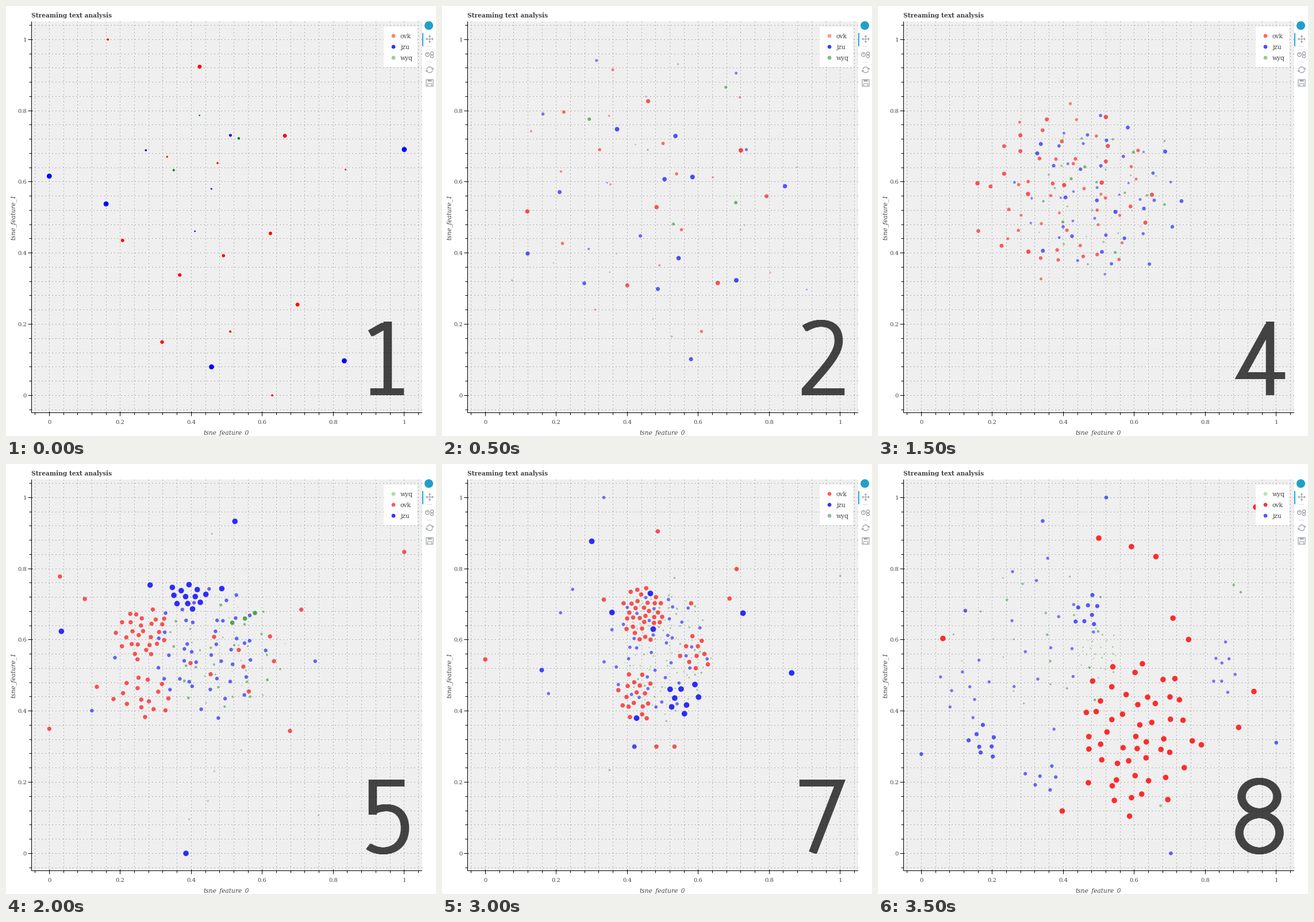
A matplotlib script that plays this animation: 748x748 px, repeating every 4000 ms.

```python
import math

import numpy as np
import matplotlib.pyplot as plt
from matplotlib.animation import FuncAnimation
from matplotlib.patches import Circle, PathPatch, Polygon, Rectangle
from matplotlib.path import Path
from matplotlib.transforms import Affine2D

DPI = 68
PX = 72 / DPI  # points per pixel
RED, BLUE, GREEN = (1, 0, 0), (0, 0, 1), (0, 0.5, 0)
INK, ICON = "#444444", "#a1a6a9"
TEAMS = {"ovk": RED, "jzu": BLUE, "wyq": GREEN}

fig = plt.figure(figsize=(11, 11), dpi=DPI, facecolor="white")
ax = fig.add_axes([0, 0, 1, 1])
ax.set_xlim(0, 748)
ax.set_ylim(748, 0)
ax.axis("off")


def px(u):
    return 75.3 + 617.5 * u


def py(v):
    return 677.3 - 619 * v


def line(xs, ys, color="black", width=1, z=3, **kw):
    ax.plot(xs, ys, color=color, lw=width * PX, zorder=z, snap=False,
            solid_capstyle="butt", dash_capstyle="butt", **kw)


def label(x, y, s, size=10.67, **kw):
    return ax.text(x, y, s, fontsize=size * PX, family="DejaVu Serif",
                   color=INK, va="baseline", zorder=8, **kw)


# Plot area, grid and axes
ax.add_patch(Rectangle((44, 27), 680, 681, fc="#efefef", ec="none", zorder=0))
for i in range(-1, 27):
    x, y = (math.floor(p(i * 0.04)) + 0.5 for p in (px, py))
    line([x, x], [707, 27], "#adadad", z=1, ls=(0, (2, 4)))
    line([44, 724], [y, y], "#adadad", z=1, ls=(0, (2, 4)))
    major = i % 5 == 0
    inner, outer = (2, 6) if major else (0, 4)
    line([x, x], [707.5 - inner, 707.5 + outer])
    line([44.5 - outer, 44.5 + inner], [y, y])
    if major:
        text = f"{i * 0.04:.1f}".replace(".0", "")
        label(x, 727, text, 10, ha="center")
        label(36, y + 3.5, text, 10, ha="right")
line([44.5, 44.5], [27, 708])
line([44, 724], [707.5, 707.5])
label(44, 20, "Streaming text analysis", weight="bold")
label(383.5, 745, "tsne_feature_0", style="italic", ha="center")
label(16, 367, "tsne_feature_1", style="italic", ha="center",
      rotation=90, rotation_mode="anchor")


# Toolbar
def ring(x, y, r, a=0, b=360):
    t = np.radians(np.linspace(a, b, 30))
    line(x + r * np.cos(t), y + r * np.sin(t), ICON, 1.4)


def arrow(*corners):
    ax.add_patch(Polygon(corners, fc=ICON, ec="none", zorder=3))


ax.add_patch(Circle((735.5, 34), 7.5, fc="#20a0c8", ec="none"))
line([725, 725], [47, 70], "#26aae1", 2)
for y in (70.5, 97.5):
    line([732, 741], [y, y], "#dddddd")
line([732, 742], [57.5, 57.5], ICON, 1.2)
line([737, 737], [52, 63], ICON, 1.2)
for d in ((1, 0), (-1, 0), (0, 1), (0, -1)):
    d = np.array(d)
    tip = d * 7 + (737, 57.5)
    arrow(tip, tip - 3 * d + 2.6 * d[::-1], tip - 3 * d - 2.6 * d[::-1])
ring(733, 84.5, 3.4)
line([733, 733], [81, 85], ICON, 1.2)
ring(741, 82.5, 2.6)
ring(741, 87.5, 2.4)
for s, start in ((1, 190), (-1, 10)):
    ring(737, 111, 5, start, start + 150)
    arrow((737 + s * 7, 111 - s * 4), (737 + s * 6.5, 111),
          (737 + s * 2.5, 111 - s))
line([731, 743, 743, 731, 731], [128, 128, 139.5, 139.5, 128], ICON, 1.3)
line([733.5, 740.5], [130, 130], ICON, 3)
line([733.5, 733.5, 740.5, 740.5], [139, 135, 135, 139], ICON, 1.2)

# Legend
ax.add_patch(Rectangle((657, 36), 58, 70, fc="white", ec="none",
                       alpha=0.95, zorder=6))
rows = [52, 71, 90]
keys = ax.scatter([674] * 3, rows, s=(6.8 * PX) ** 2, lw=0, zorder=8)
names = [label(686, y + 4, "") for y in rows]
LEGEND = [
    (("ovk", 0.5), ("jzu", 0.8), ("wyq", 0.38)),
    (("ovk", 0.4), ("jzu", 0.75), ("wyq", 0.5)),
    (("ovk", 0.3), ("jzu", 0.75), ("wyq", 0.65)),
    (("ovk", 0.6), ("jzu", 0.7), ("wyq", 0.4)),
    (("wyq", 0.3), ("ovk", 0.65), ("jzu", 0.8)),
    (("ovk", 0.8), ("jzu", 0.75), ("wyq", 0.35)),
    (("ovk", 0.65), ("jzu", 0.8), ("wyq", 0.45)),
    (("wyq", 0.25), ("ovk", 0.8), ("jzu", 0.65)),
]

# Step numerals: centre lines drawn with a pen wider than it is tall
numerals = []


def bar(*xy):
    return Path(np.reshape(xy, (-1, 2)))


def curve(*xy):
    pts = np.reshape(xy, (-1, 2))
    return Path(pts, [Path.MOVETO] + [Path.CURVE4] * (len(pts) - 1))


def oval(x, y, rx, ry):
    return Affine2D().scale(rx, ry).translate(x, y).transform_path(
        Path.unit_circle())


def numeral(*parts):
    shape = Path.make_compound_path(*parts)
    numerals.append(Path.make_compound_path(
        *(Affine2D().translate(dx, 0).transform_path(shape)
          for dx in (-1.25, 1.25))))


numeral(bar(634, 569.5, 658, 556), bar(664, 549, 664, 671),
        bar(635, 671, 691, 671))
numeral(curve(631, 561, 640, 555, 650, 552, 659, 552, 680, 552, 690, 564,
              690, 582, 690, 604, 672, 624, 632, 669),
        bar(627, 671, 699, 671))
numeral(curve(629, 560, 638, 555, 648, 552, 658, 552, 677, 552, 688, 562,
              688, 577, 688, 595, 674, 606, 654, 606),
        bar(648, 606, 656, 606),
        curve(654, 606, 680, 606, 694, 618, 694, 638, 694, 660, 678, 673,
              655, 673, 645, 673, 634, 670, 627, 665))
numeral(bar(707, 643, 632, 643, 680, 556), bar(682, 549, 682, 677))
numeral(bar(692, 555, 638, 555, 638, 610),
        curve(637, 604, 645, 600, 653, 598, 662, 598, 682, 598, 694, 612,
              694, 633, 694, 658, 678, 673, 656, 673, 647, 673, 637, 670,
              631, 665))
numeral(curve(696, 556, 689, 553, 683, 552, 677, 552, 645, 552, 628, 576,
              628, 619, 628, 655, 641, 673, 663, 673, 683, 673, 697, 658,
              697, 636, 697, 614, 683, 600, 664, 600, 646, 600, 628, 610,
              628, 634))
numeral(bar(623, 555, 692, 555, 645, 676))
numeral(oval(663.5, 578.5, 31, 26.5), oval(663.5, 641.5, 35, 31.5))
big = ax.add_patch(PathPatch(numerals[0], fill=False, ec=(0, 0, 0, 0.72),
                             lw=12 * PX, capstyle="butt", joinstyle="miter",
                             zorder=4))

# Dots per step: rows of u, v, radius, r, g, b
steps = [[] for _ in range(8)]
rng = np.random.default_rng(12)


def dots(k, colour, r, *points):
    steps[k] += [(u, v, r, *colour) for u, v in points]


def cloud(k, colour, n, centre, spread, small, large=None):
    """Jittered sunflower pattern: even spacing inside an ellipse."""
    turn = rng.uniform(0, 6)
    for i in range(n):
        a = turn + i * math.pi * (3 - math.sqrt(5))
        rho = ((i + 0.5) / n) ** 0.55
        u, v = centre + spread * (rho * np.array([math.cos(a), math.sin(a)])
                                  + rng.normal(0, 0.06, 2))
        dots(k, colour, rng.uniform(small, large or small), (u, v))


def settle(rows):
    """Push dots apart until they stop touching."""
    rows = np.array(rows)
    p, r = rows[:, :2], rows[:, 2]
    gap = (r[:, None] + r + 3) / 618
    for _ in range(15):
        d = p[:, None] - p
        dist = np.hypot(d[..., 0], d[..., 1]) + np.eye(len(p))
        push = np.clip(gap - dist, 0, None) / dist
        p += 0.3 * (d * push[..., None]).sum(axis=1)
        np.clip(p, 0, 1, out=p)
    return rows


cloud(0, GREEN, 3, (0.41, 0.72), (0.15, 0.16), 1.1, 2.4)
cloud(0, BLUE, 4, (0.38, 0.6), (0.22, 0.18), 1.1, 2.6)
cloud(0, RED, 12, (0.47, 0.48), (0.36, 0.48), 1.3, 3.6)
dots(0, RED, 1.9, (0.165, 1), (0.628, 0))
dots(0, BLUE, 4.4, (0, 0.616), (1, 0.691), (0.16, 0.538), (0.457, 0.08),
     (0.831, 0.097))

cloud(1, GREEN, 7, (0.48, 0.54), (0.34, 0.4), 1.2, 3.2)
cloud(1, BLUE, 22, (0.5, 0.53), (0.44, 0.46), 1.2, 4.2)
cloud(1, RED, 32, (0.46, 0.56), (0.42, 0.42), 1.2, 4)

cloud(2, GREEN, 7, (0.48, 0.5), (0.15, 0.14), 1.5, 3.6)
cloud(2, BLUE, 38, (0.43, 0.58), (0.33, 0.3), 1, 3.2)
cloud(2, RED, 56, (0.44, 0.6), (0.33, 0.31), 1.3, 3.7)
dots(2, GREEN, 2.3, (0, 0.755), (0.623, 0.973))
dots(2, BLUE, 2.7, (0.043, 0), (0.106, 0.502), (0.687, 0.315))
dots(2, BLUE, 4, (0.606, 0.779), (0.406, 0.56), (0.244, 0.472),
     (0.401, 0.371))
dots(2, RED, 2, (1, 0.387))
dots(2, RED, 4.8, (0.21, 0.83))

cloud(3, GREEN, 32, (0.5, 0.56), (0.2, 0.2), 1.1, 2.6)
cloud(3, BLUE, 48, (0.5, 0.57), (0.24, 0.24), 2, 3.6)
cloud(3, RED, 58, (0.4, 0.57), (0.25, 0.25), 2.5, 3.8)

cloud(4, GREEN, 46, (0.5, 0.56), (0.17, 0.17), 0.9, 2.6)
dots(4, GREEN, 1.5, (0.458, 0.898), (0.541, 0.29), (0.465, 0.231),
     (0.447, 0.147), (0.394, 0.096), (0.758, 0.107))
dots(4, GREEN, 3.8, (0.519, 0.653), (0.557, 0.665), (0.569, 0.672))
cloud(4, BLUE, 45, (0.45, 0.57), (0.17, 0.18), 3.2)
dots(4, BLUE, 3.2, (0.749, 0.54), (0.185, 0.55), (0.12, 0.401))
cloud(4, RED, 28, (0.262, 0.617), (0.075, 0.08), 3.7)
cloud(4, RED, 16, (0.265, 0.44), (0.09, 0.065), 3.7)
cloud(4, RED, 8, (0.54, 0.54), (0.14, 0.1), 3.7)
dots(4, RED, 3.7, (0.03, 0.778), (0.1, 0.715), (1, 0.847), (0.71, 0.685),
     (0, 0.35), (0.678, 0.344), (0.134, 0.468))
cloud(4, BLUE, 12, (0.392, 0.725), (0.06, 0.04), 4.8)
dots(4, BLUE, 4.8, (0.523, 0.933), (0.284, 0.754), (0.486, 0.744),
     (0.034, 0.624), (0.385, 0))

cloud(5, GREEN, 76, (0.32, 0.52), (0.18, 0.17), 0.9, 1.8)
dots(5, GREEN, 1.8, (0.034, 0.466), (0.114, 0.607), (0.5, 0.278),
     (0.433, 0.356), (0.647, 0.478), (0.462, 0.77))
cloud(5, BLUE, 33, (0.33, 0.52), (0.19, 0.15), 2.5, 3.2)
dots(5, BLUE, 2.5, (0.249, 0.847), (0.168, 0.779), (0.352, 0.223))
cloud(5, BLUE, 16, (0.485, 0.495), (0.06, 0.075), 4.2)
dots(5, BLUE, 4.2, (0.582, 0.713), (0.635, 0.677), (0.798, 0.674),
     (0.855, 0.558), (0.614, 0.593), (0.614, 0.224), (0.473, 0.171))
cloud(5, RED, 36, (0.45, 0.61), (0.15, 0.08), 4.8)
cloud(5, RED, 15, (0.36, 0.48), (0.22, 0.09), 4.8)
dots(5, RED, 4.8, (0.111, 1), (0.713, 0.874), (0.399, 0.864), (0.528, 0.746),
     (0, 0.54), (0.142, 0.334), (0.387, 0.191), (0.86, 0), (0.128, 0.445))

cloud(6, GREEN, 84, (0.51, 0.565), (0.12, 0.18), 0.9, 1.8)
dots(6, GREEN, 1.8, (1, 0.78), (0.35, 0.234), (0.533, 0.774))
cloud(6, BLUE, 40, (0.48, 0.57), (0.14, 0.18), 2.9)
dots(6, BLUE, 2.8, (0.334, 1), (0.246, 0.742), (0.212, 0.676), (0.178, 0.449))
dots(6, BLUE, 4, (0.159, 0.515), (0.42, 0.3))
cloud(6, RED, 32, (0.445, 0.675), (0.065, 0.075), 3.8)
cloud(6, RED, 18, (0.425, 0.445), (0.05, 0.08), 3.8)
cloud(6, RED, 10, (0.59, 0.56), (0.05, 0.055), 3.8)
dots(6, RED, 3.8, (0.486, 0.905), (0.708, 0.799), (0.688, 0.716), (0, 0.545),
     (0.334, 0.713), (0.533, 0.3), (0.482, 0.3), (0.578, 0.698))
cloud(6, BLUE, 8, (0.555, 0.435), (0.065, 0.05), 4.9)
dots(6, BLUE, 4.9, (0.3, 0.877), (0.465, 0.729), (0.357, 0.677),
     (0.47, 0.624), (0.726, 0.675), (0.863, 0.507), (0.427, 0.383))

cloud(7, GREEN, 24, (0.5, 0.56), (0.06, 0.07), 0.9, 1.6)
cloud(7, GREEN, 24, (0.33, 0.6), (0.25, 0.22), 1.2, 2.3)
dots(7, GREEN, 2.2, (0.88, 0.754), (0.9, 0.734), (0.674, 0.134))
cloud(7, BLUE, 14, (0.36, 0.62), (0.15, 0.26), 2.7)
cloud(7, BLUE, 9, (0.12, 0.46), (0.09, 0.09), 2.7)
cloud(7, BLUE, 8, (0.85, 0.52), (0.035, 0.1), 2.7)
cloud(7, BLUE, 6, (0.34, 0.21), (0.07, 0.04), 3.1)
cloud(7, BLUE, 8, (0.47, 0.68), (0.045, 0.05), 3.6)
cloud(7, BLUE, 8, (0.175, 0.31), (0.055, 0.05), 3.6)
dots(7, BLUE, 3.3, (0.521, 1), (1, 0.311), (0, 0.279), (0.342, 0.934),
     (0.703, 0), (0.124, 0.682))
cloud(7, RED, 50, (0.6, 0.33), (0.16, 0.22), 4.8)
dots(7, RED, 4.8, (0.942, 0.973), (0.5, 0.886), (0.592, 0.862),
     (0.661, 0.834), (0.061, 0.604), (0.709, 0.661), (0.753, 0.601),
     (0.937, 0.455), (0.894, 0.354), (0.789, 0.305), (0.397, 0.119))

steps = [settle(s) for s in steps]
marks = ax.scatter([], [], lw=0, zorder=3.5)


def draw(k):
    u, v, r = steps[k][:, :3].T
    alpha = np.ones_like(r) if k == 0 else np.clip(0.14 + 0.14 * r, 0, 0.82)
    marks.set_offsets(np.column_stack([px(u), py(v)]))
    marks.set_sizes((2 * r * PX) ** 2)
    marks.set_facecolors(np.column_stack([steps[k][:, 3:], alpha]))
    big.set_path(numerals[k])
    for text, (name, _) in zip(names, LEGEND[k]):
        text.set_text(name)
    keys.set_facecolors([(*TEAMS[n], a) for n, a in LEGEND[k]])
    return marks, big, keys, *names


anim = FuncAnimation(fig, draw, frames=8, interval=500, repeat=True,
                     repeat_delay=0, blit=False)
plt.show()
```
